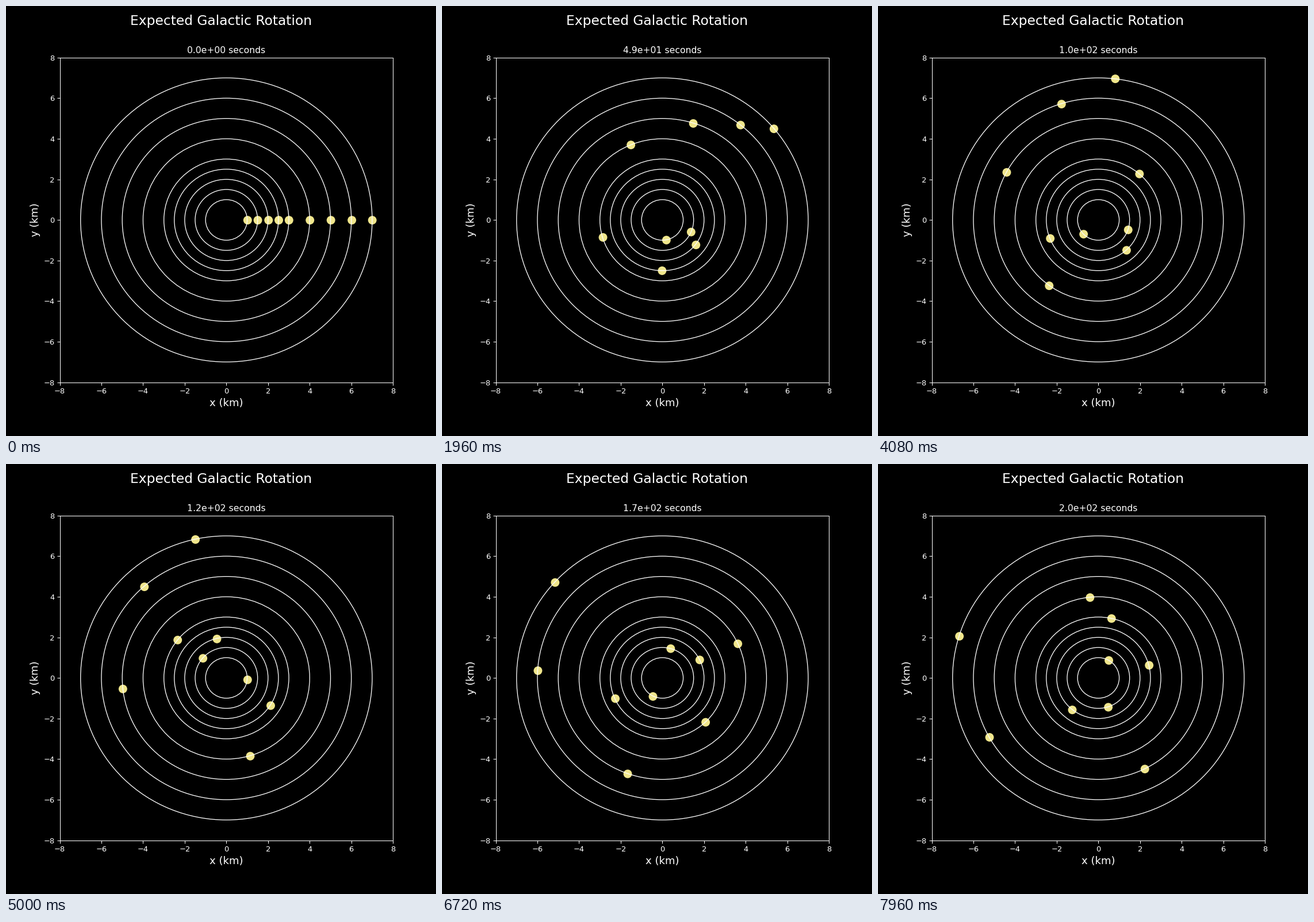
These frames come from a looping animation (748 by 748 pixels, 8000 ms). A matplotlib script:

```python
import numpy as np
import matplotlib.pyplot as plt
from matplotlib.animation import FuncAnimation
from matplotlib.patches import Circle

FRAMES, INTERVAL = 200, 40
SIZE = 8            # inches
GRID = 100          # dots sit on a grid of 1/100 inch
RADII = np.array([1, 1.5, 2, 2.5, 3, 4, 5, 6, 7])
SPEEDS = np.array([0.10, 0.18, 0.23, 0.24, 0.21, 0.16, 0.13, 0.11, 0.10])
DOT_RADIUS = 5.75 / 72

plt.style.use("dark_background")
plt.rcParams["font.family"] = "DejaVu Sans"

fig, ax = plt.subplots(figsize=(SIZE, SIZE), dpi=93.5)
fig.subplots_adjust(left=0.125, right=0.9, bottom=0.125, top=0.88)
fig.suptitle("Expected Galactic Rotation", fontsize=18)
ax.set(xlim=(-8, 8), ylim=(-8, 8))
ax.set_xlabel("x (km)", fontsize=14)
ax.set_ylabel("y (km)", fontsize=14)
title = ax.set_title("", fontsize=12)

dots = []
for r in RADII:
    ax.add_patch(Circle((0, 0), r, fill=False, ec="white", lw=1, zorder=2))
    dot = Circle((0, 0), DOT_RADIUS, fc="khaki", lw=0, zorder=1,
                 transform=fig.dpi_scale_trans)
    dots.append(ax.add_patch(dot))


def to_inches(x, y):
    """Data coordinates to figure inches, snapped to the dot grid."""
    box = ax.get_position()
    left = SIZE * (box.x0 + box.width * (x + 8) / 16)
    down = SIZE * (1 - box.y0 - box.height * (y + 8) / 16)
    snap = lambda v: (np.floor(v * GRID + 0.5) + 0.5) / GRID
    return snap(left), SIZE - snap(down)


def update(t):
    angle = SPEEDS / RADII * t
    xs, ys = to_inches(RADII * np.cos(angle), RADII * np.sin(angle))
    for dot, x, y in zip(dots, xs, ys):
        dot.center = x, y
    title.set_text(f"{t:.1e} seconds")
    return [*dots, title]


anim = FuncAnimation(fig, update, frames=FRAMES, interval=INTERVAL,
                     repeat=True, repeat_delay=0)
plt.show()
```
